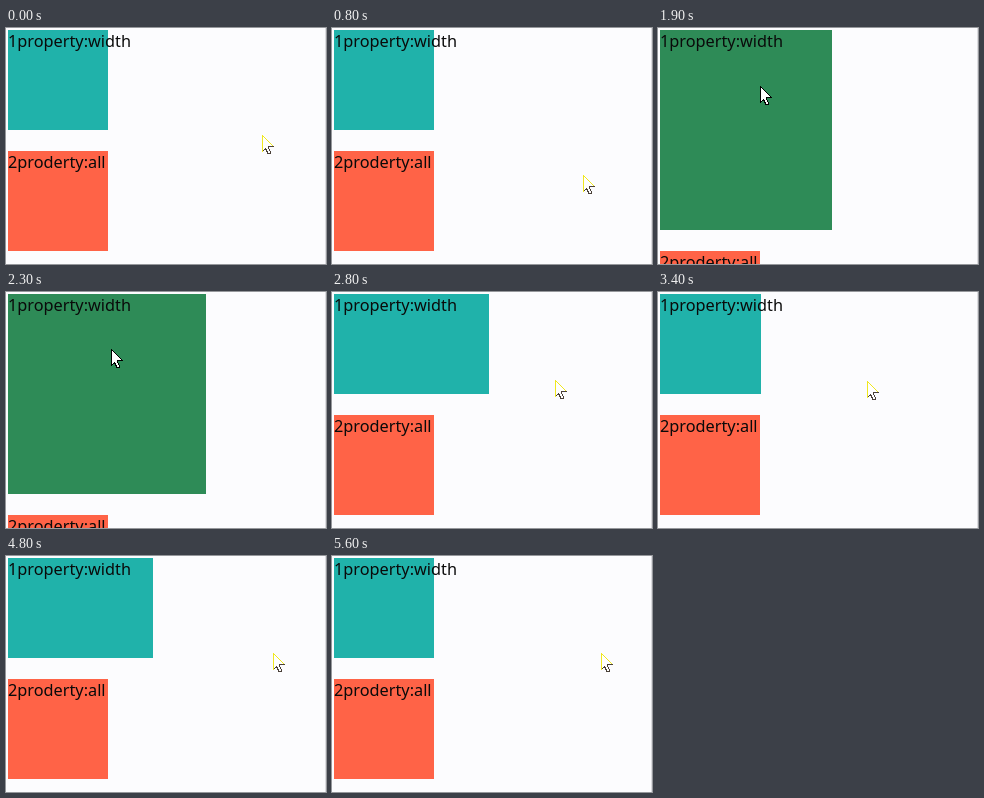
Write an HTML page that moves like this. It is 320x236 px and loops after 5.7 s.

```html
<!DOCTYPE html>
<html lang="en">
<head>
<meta charset="utf-8">
<title>Transition property</title>
<style>
  html, body { margin: 0; width: 100%; height: 100%; overflow: hidden; background: #fcfcfe; }
  svg { display: block; width: 320px; height: 236px; }
  text { font: 16.3px "Noto Sans", "Open Sans", sans-serif; fill: #0a0a0a; }
  #cursor { shape-rendering: crispEdges; }
</style>
</head>
<body>
<svg viewBox="0 0 320 236">
  <rect width="320" height="236" fill="#fcfcfe"/>
  <rect x="319" width="1" height="236" fill="#dcdce0"/>
  <rect id="box" x="2" y="2"/>
  <text x="2" y="19">1property:width</text>
  <g id="second">
    <rect x="2" width="100" height="100" fill="#ff6347"/>
    <text x="2" y="17">2proderty:all</text>
  </g>
  <g id="cursor" fill="none">
    <path d="M.5 .5V16.5L3.5 13.5L6 18.5H8L8.5 17L6.5 11.5H11.5Z" fill="#fff"/>
    <path id="tail" d="M.5 16.5L3.5 13.5L6 18.5H8L8.5 17L6.5 12.5V11.5H11.5"/>
    <path id="sides" d="M.5 16.5V.5L11.5 11.5"/>
  </g>
</svg>
<script>
const LOOP = 5700, STEP = 100, DURATION = 1000;
const hovers = [{ enter: 1470, leave: 2530 }, { enter: 3580, leave: 4480 }];

// Turning points of the pointer, which glides between them
const stops = [
  { at: 0, x: 256, y: 107 },
  { at: 400, x: 296, y: 208 },
  { at: 1200, x: 206, y: 85 },
  { at: 1500, x: 99, y: 58 },
  { at: 2350, x: 105, y: 57 },
  { at: 2650, x: 225, y: 88 },
  { at: 3400, x: 209, y: 89 },
  { at: 3600, x: 92, y: 58 },
  { at: 4200, x: 80, y: 51 },
  { at: 4600, x: 308, y: 98 },
  { at: 4800, x: 267, y: 97 },
  { at: LOOP, x: 269, y: 97 }
];

const set = (id, attrs) => {
  const node = document.getElementById(id);
  for (const key in attrs) node.setAttribute(key, attrs[key]);
};

const glide = p => p * p * (3 - 2 * p);

// CSS "ease": cubic-bezier(.25, .1, .25, 1), solved by bisection
function ease(p) {
  if (p <= 0 || p >= 1) return p <= 0 ? 0 : 1;
  const bezier = (a, b, s) => 3 * a * s * (1 - s) ** 2 + 3 * b * s * s * (1 - s) + s ** 3;
  let lo = 0, hi = 1;
  for (let i = 0; i < 24; i++) {
    const mid = (lo + hi) / 2;
    if (bezier(.25, .25, mid) < p) lo = mid; else hi = mid;
  }
  return bezier(.1, 1, lo);
}

function boxWidth(t) {
  const visit = hovers.filter(h => t >= h.enter).pop();
  if (!visit) return 100;
  const grown = ease((Math.min(t, visit.leave) - visit.enter) / DURATION);
  return 100 + 100 * grown * (1 - ease((t - visit.leave) / DURATION));
}

function pointer(t) {
  const next = stops.findIndex(stop => stop.at > t);
  const a = stops[next - 1], b = stops[next];
  const p = glide((t - a.at) / (b.at - a.at));
  return [a.x + (b.x - a.x) * p, a.y + (b.y - a.y) * p].map(Math.round);
}

function render(t) {
  const hover = hovers.some(h => t >= h.enter && t < h.leave);
  set("box", {
    width: Math.round(boxWidth(t)),
    height: hover ? 200 : 100,
    fill: hover ? "#2e8b57" : "#20b2aa"
  });
  set("second", { transform: `translate(0 ${hover ? 223 : 123})` });
  set("cursor", { transform: `translate(${pointer(t)})` });
  set("sides", { stroke: hover ? "#000" : "#f0e820" });
  set("tail", { stroke: hover ? "#000" : "#4a4038" });
}

const start = performance.now();
function tick() {
  const t = (performance.now() - start) % LOOP;
  render(Math.floor(t / STEP) * STEP);
  requestAnimationFrame(tick);
}
tick();
</script>
</body>
</html>
```
